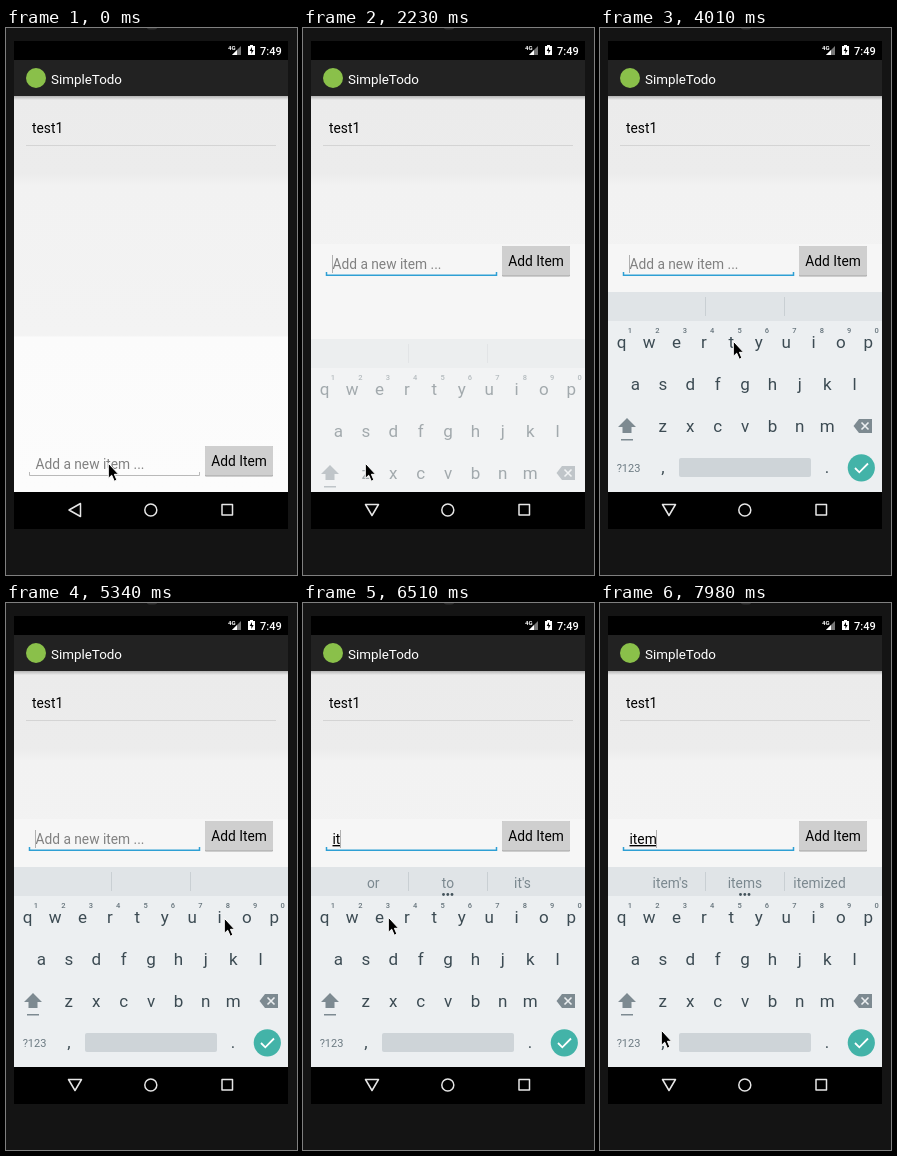
An HTML page that plays this animation: 291 px wide and 547 px high, repeating every 8000 ms.

```html
<!DOCTYPE html>
<html lang="en">
<head>
<meta charset="utf-8">
<title>Todo app</title>
<style>
html, body { margin: 0; width: 100%; height: 100%; overflow: hidden; background: #141414; }
svg { display: block; width: 291px; height: 547px; }
text { font: 13.75px Roboto, "Open Sans", sans-serif; }
.mid { text-anchor: middle; }
.key { font-size: 17px; fill: #3c4b53; }
.num { font-size: 7.5px; font-weight: 500; fill: #66747c; }
.sug { fill: #7b888f; }
.typed { text-decoration: underline; }

.anim { animation: 8s step-end infinite; }
.cursor { animation-name: cursor; }
.form { animation-name: form; }
.board { animation-name: board; }
.caret { animation-name: caret; }
.late { animation-name: late; }
.open { animation-name: open; }
.closed { animation-name: closed; }
.hint { animation-name: hint; }
.dots { animation-name: dots; }
.w1 { animation-name: w1; }
.w2 { animation-name: w2; }
.w3 { animation-name: w3; }
.w4 { animation-name: w4; }
.s2 { animation-name: s2; }
.s3 { animation-name: s3; }

@keyframes cursor {
  0% { transform: translate(101px, 434px) }
  16.75% { transform: translate(92px, 434px) }
  18.625% { transform: translate(76px, 434px) }
  20.5% { transform: translate(65px, 434px) }
  22.375% { transform: translate(61px, 434px) }
  37.125% { transform: translate(108px, 370px) }
  39% { transform: translate(138px, 328px) }
  42.625% { transform: translate(136px, 318px) }
  44.5% { transform: translate(134px, 312px) }
  50.125% { transform: translate(132px, 312px) }
  55.625% { transform: translate(146px, 312px) }
  57.5% { transform: translate(184px, 313px) }
  59.375% { transform: translate(230px, 314px) }
  61.125% { transform: translate(259px, 314px) }
  63% { transform: translate(250px, 314px) }
  64.875% { transform: translate(232px, 314px) }
  66.75% { transform: translate(217px, 314px) }
  72.25% { transform: translate(190px, 312px) }
  74% { transform: translate(150px, 309px) }
  75.75% { transform: translate(129px, 308px) }
  79.5% { transform: translate(110px, 311px) }
  81.375% { transform: translate(84px, 313px) }
  83.25% { transform: translate(74px, 314px) }
  85% { transform: translate(80px, 318px) }
  86.875% { transform: translate(159px, 371px) }
  88.75% { transform: translate(212px, 390px) }
  90.5% { transform: translate(222px, 396px) }
  94.25% { transform: translate(212px, 400px) }
  96% { transform: translate(165px, 410px) }
  97.875% { transform: translate(117px, 414px) }
  99.75% { transform: translate(60px, 426px) }
}
@keyframes form { 0% { transform: translateY(200px) } 27.875% { transform: none } }
@keyframes board {
  0% { transform: translateY(60px); opacity: 0 }
  27.875% { transform: translateY(47px); opacity: .45 }
  29.625% { transform: translateY(10px); opacity: .88 }
  31.5% { transform: none; opacity: 1 }
}
@keyframes caret {
  0% { opacity: 0; transform: none }
  26% { opacity: 1; transform: none }
  31.5% { opacity: 0; transform: none }
  37.125% { opacity: 1; transform: none }
  42.625% { opacity: 0; transform: none }
  48.25% { opacity: 1; transform: none }
  55.625% { opacity: 0; transform: none }
  61.125% { opacity: 1; transform: none }
  68.5% { opacity: 0; transform: none }
  70.375% { opacity: 1; transform: translateX(4px) }
  75.75% { opacity: 0; transform: translateX(4px) }
  77.625% { opacity: 1; transform: translateX(8px) }
  83.25% { opacity: 0; transform: translateX(8px) }
  85% { opacity: 1; transform: translateX(15px) }
  90.5% { opacity: 0; transform: translateX(15px) }
  94.25% { opacity: 1; transform: translateX(27px) }
}
@keyframes late { 0% { opacity: 0 } 26% { opacity: 1 } }
@keyframes open { 0% { opacity: 0 } 27.875% { opacity: 1 } }
@keyframes closed { 0% { opacity: 1 } 27.875% { opacity: 0 } }
@keyframes hint { 0% { opacity: 1 } 70.375% { opacity: 0 } }
@keyframes dots { 0% { opacity: 0 } 70.375% { opacity: 1 } }
@keyframes w1 { 0% { opacity: 0 } 70.375% { opacity: 1 } 77.625% { opacity: 0 } }
@keyframes w2 { 0% { opacity: 0 } 77.625% { opacity: 1 } 85% { opacity: 0 } }
@keyframes w3 { 0% { opacity: 0 } 85% { opacity: 1 } 94.25% { opacity: 0 } }
@keyframes w4 { 0% { opacity: 0 } 94.25% { opacity: 1 } }
@keyframes s2 { 0% { opacity: 0 } 77.625% { opacity: 1 } 88.75% { opacity: 0 } }
@keyframes s3 { 0% { opacity: 0 } 88.75% { opacity: 1 } 94.25% { opacity: 0 } }
</style>
</head>
<body>
<svg viewBox="0 0 291 547">
  <defs>
    <clipPath id="view"><rect x="8" y="68" width="274" height="396"/></clipPath>
    <linearGradient id="page" gradientUnits="userSpaceOnUse" x1="0" y1="69" x2="0" y2="463">
      <stop offset="0" stop-color="#ebebeb"/>
      <stop offset=".195" stop-color="#ececec"/>
      <stop offset=".225" stop-color="#f2f2f2"/>
      <stop offset=".605" stop-color="#f3f3f3"/>
      <stop offset=".61" stop-color="#fbfbfb"/>
      <stop offset="1" stop-color="#fcfcfc"/>
    </linearGradient>
    <linearGradient id="shade" x2="0" y2="1">
      <stop offset="0" stop-color="#b4b4b4"/>
      <stop offset="1" stop-color="#ebebeb"/>
    </linearGradient>
  </defs>

  <!-- phone body -->
  <rect width="291" height="547" fill="#141414"/>
  <ellipse cx="146" cy="0" rx="5" ry="1.5" fill="#303030"/>
  <rect x="8" y="13" width="274" height="488"/>

  <!-- status bar -->
  <g fill="#fff">
    <text x="222" y="22" style="font-size:6px;font-weight:700">4G</text>
    <path d="M235 18V27H226Z" fill="#777"/>
    <path d="M231 22V27H226Z"/>
    <path d="M244 18V17H247V18H249V27H242V18Z"/>
    <path d="M246 19L243.7 23H245.4V26L247.6 22H246Z" fill="#000"/>
    <text x="254" y="27" style="font-size:11px;font-weight:500">7:49</text>
  </g>

  <!-- action bar -->
  <rect x="8" y="32" width="274" height="36" fill="#222"/>
  <circle cx="30" cy="50" r="10" fill="#8ac04a"/>
  <text x="45" y="55.5" fill="#fff" style="font-size:13.4px">SimpleTodo</text>

  <g clip-path="url(#view)">
    <rect x="8" y="68" width="274" height="396" fill="url(#page)"/>
    <rect x="8" y="68" width="274" height="4" fill="url(#shade)"/>
    <text x="26" y="105">test1</text>
    <rect x="20" y="117" width="250" height="1" fill="#d4d4d4"/>
    <rect class="anim open" x="8" y="216" width="274" height="248" fill="#f6f6f6"/>

    <!-- entry field and button -->
    <g class="anim form">
      <text class="anim hint" x="29.5" y="241" fill="#808080">Add a new item ...</text>
      <g class="typed">
        <text class="anim w1" x="29.5" y="241">i</text>
        <text class="anim w2" x="29.5" y="241">it</text>
        <text class="anim w3" x="29.5" y="241">ite</text>
        <text class="anim w4" x="29.5" y="241">item</text>
      </g>
      <rect class="anim caret" x="29" y="227" width="1" height="18" fill="#b0b0b0"/>
      <path d="M23.5 244V247.5H193.5V244" fill="none" stroke="#b9b9b9"/>
      <path class="anim late" d="M23.5 244V247.3H193.5V244" fill="none" stroke="#2e9fd4" stroke-width="1.5"/>
      <rect x="199" y="218" width="68" height="30.5" rx="1" fill="#a4a4a4"/>
      <rect x="199" y="218" width="68" height="29.5" rx="1" fill="#cfcfcf"/>
      <text class="mid" x="233" y="238">Add Item</text>
    </g>

    <!-- keyboard -->
    <g class="anim board">
      <rect x="8" y="264" width="274" height="29" fill="#e0e4e7"/>
      <rect x="8" y="293" width="274" height="171" fill="#eceff1"/>
      <path d="M105.5 269V288M184.5 269V288" stroke="#c9cfd3"/>
      <g id="words"></g>
      <g class="anim dots" fill="#44545c">
        <circle cx="140.5" cy="291.5" r="1.4"/><circle cx="144.8" cy="291.5" r="1.4"/><circle cx="149" cy="291.5" r="1.4"/>
      </g>
      <g id="keys"></g>
      <path d="M27 390L36 399H31.5V405H22.5V399H18Z" fill="#7d8a91"/>
      <rect x="21" y="411" width="12" height="1.5" fill="#7d8a91"/>
      <path d="M259 391H272V405H259L253.5 398Z" fill="#7d8a91"/>
      <path d="M261.5 394.5L268.5 401.5M268.5 394.5L261.5 401.5" stroke="#eceff1" stroke-width="1.6"/>
      <text class="mid" x="28.5" y="444" fill="#6c7a82" style="font-size:11px">?123</text>
      <text class="key mid" x="63" y="445">,</text>
      <rect x="79" y="430" width="132" height="19" rx="2" fill="#ced4d8"/>
      <text class="key mid" x="227" y="445">.</text>
      <circle cx="261.3" cy="439.8" r="13.6" fill="#43b3a8"/>
      <path d="M255 440L259.3 444.3L268 435.5" fill="none" stroke="#fff" stroke-width="1.8"/>
    </g>
  </g>

  <!-- navigation bar -->
  <g fill="none" stroke="#e6e6e6" stroke-width="1.5" stroke-linejoin="round">
    <path class="anim closed" d="M63 482L74.5 475.5V488.5Z"/>
    <path class="anim open" d="M62.5 476.5H75.5L69 487.5Z"/>
    <circle cx="144.8" cy="482" r="6"/>
    <rect x="216" y="476.5" width="10.5" height="10.5"/>
  </g>

  <path class="anim cursor" d="M1.3 1.2V16.4L4.7 13.2L7.3 19.2L9.9 18.1L7.4 12.3H11.6Z" stroke="#fff" stroke-width="1"/>
</svg>
<script>
const add = (id, cls, x, y, str) => {
  const node = document.createElementNS("http://www.w3.org/2000/svg", "text");
  node.setAttribute("class", cls + " mid");
  node.setAttribute("x", x);
  node.setAttribute("y", y);
  node.textContent = str;
  document.getElementById(id).append(node);
};

const step = 27.4;
[["qwertyuiop", 21.7, 320], ["asdfghjkl", 35.4, 362], ["zxcvbnm", 62.8, 404]].forEach(([row, x, y]) =>
  [...row].forEach((ch, i) => add("keys", "key", x + i * step, y, ch)));
[..."1234567890"].forEach((ch, i) => add("keys", "num", 30 + i * step, 305, ch));

const guesses = {
  w1: ["in", "I", "is"],
  s2: ["or", "to", "it's"],
  s3: ["it's", "item", "items"],
  w4: ["item's", "items", "itemized"]
};
for (const [cls, list] of Object.entries(guesses))
  list.forEach((word, i) => add("words", "sug anim " + cls, 70.3 + i * 74.6, 285, word));
</script>
</body>
</html>
```
